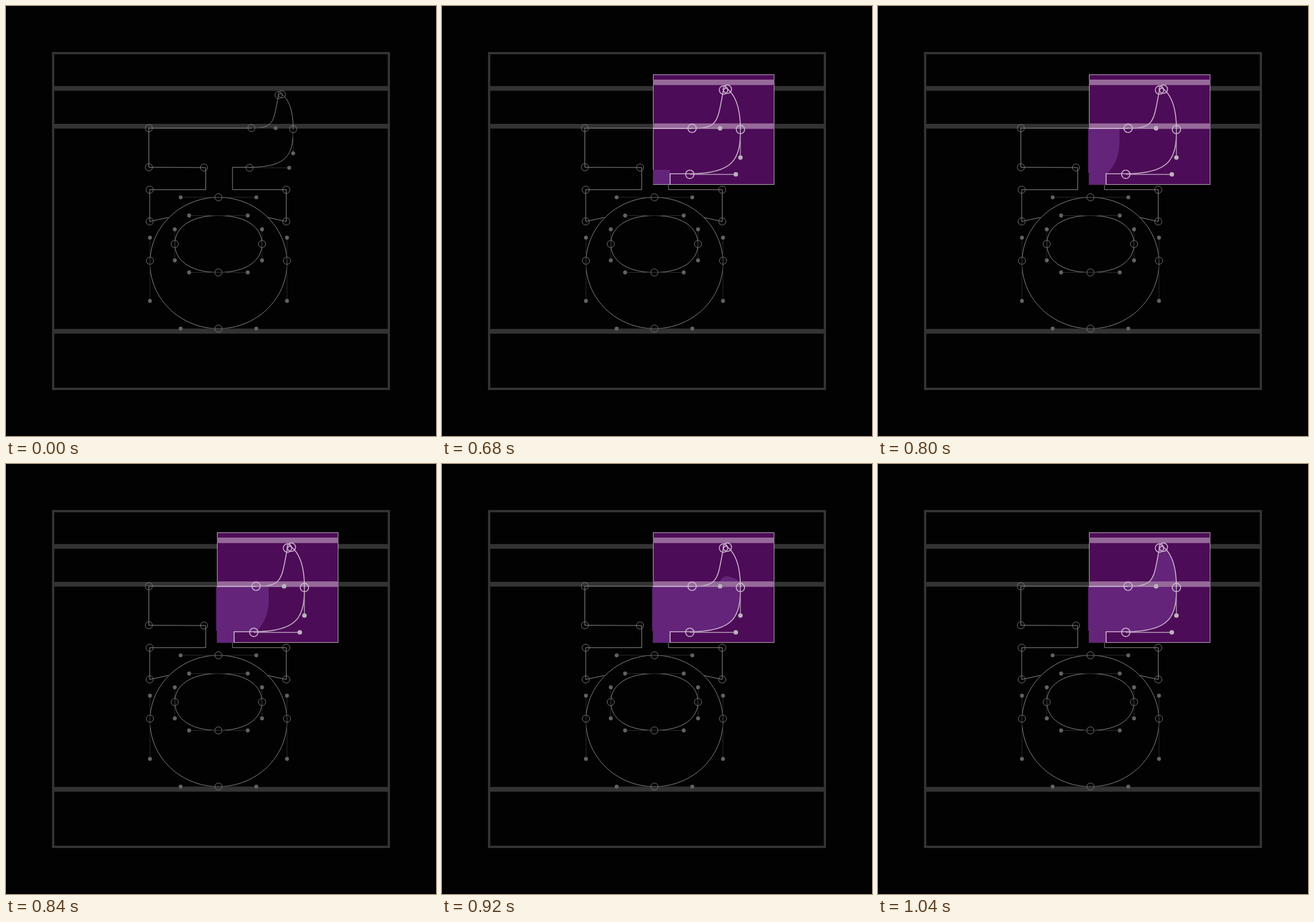
Animation of 748 by 748 pixels, one loop 3.64 s. Source, as an HTML page:

```html
<!DOCTYPE html>
<html lang="en">
<head>
<meta charset="utf-8">
<title>Glyph outline</title>
<style>
  html, body { margin: 0; width: 100%; height: 100%; overflow: hidden; background: #020202; }
  svg { display: block; width: 100%; height: 100%; fill: none; }
  .base { --line: #8c8c8c; --ring: #777; --dot: #626262; --arm: #2c2c2c; stroke-width: 1; }
  .zoom { --line: #cdb6d0; --ring: #cdb6d0; --dot: #bbb2bd; --arm: #a688ab; stroke-width: 1.4; }
  .line { stroke: var(--line); }
  .ring { stroke: var(--ring); }
  .arm { stroke: var(--arm); }
  .dot { fill: var(--dot); }
</style>
</head>
<body>
<svg viewBox="0 0 748 748">
  <defs>
    <clipPath id="box"><rect x="367" y="119" width="211" height="192"/></clipPath>
    <clipPath id="wipe"><path id="edge"/></clipPath>
    <path id="bands" d="M84 143.4H664M84 209.2H664M84 565.8H664" stroke-width="8.2"/>
    <g id="hook"></g>
  </defs>

  <rect x="82" y="82" width="584" height="584" stroke="#333" stroke-width="4"/>
  <use href="#bands" stroke="#333"/>
  <g class="base">
    <g id="body"></g>
    <use href="#hook"/>
  </g>

  <g id="panel" visibility="hidden">
    <rect x="367.5" y="119.5" width="210.2" height="191" fill="#4d0c57" stroke="#b8a5ba" stroke-width="1.1"/>
    <g clip-path="url(#wipe)">
      <path id="ink" fill="#64247a" transform="translate(-60.3 -33.6) scale(1.16)"/>
    </g>
    <g clip-path="url(#box)">
      <g class="zoom" transform="translate(-60.3 -33.6) scale(1.16)">
        <use href="#bands" stroke="#966a9a"/>
        <use href="#hook"/>
      </g>
    </g>
  </g>
</svg>
<script>
const $ = id => document.getElementById(id);
const body = $('body'), hook = $('hook');

function add(parent, tag, attrs) {
  const el = document.createElementNS('http://www.w3.org/2000/svg', tag);
  for (const k in attrs) el.setAttribute(k, attrs[k]);
  parent.append(el);
}
const stroke = (parent, d, cls = 'line') => add(parent, 'path', { class: cls, d });
const ring = (parent, [cx, cy]) => add(parent, 'circle', { class: 'ring', r: 6.3, cx, cy });
const dot = (parent, [cx, cy]) => add(parent, 'circle', { class: 'dot', r: 3.4, cx, cy });

// Closed curve with a node and a tangent arm at each extreme.
// hx, hy: curve handles; arm, drop: half length and shift of the side arms.
function bowl({ cx, cy, rx, ry, hx, hy, arm, drop, lift = 0, top = true }) {
  const l = cx - rx, r = cx + rx, t = cy - ry, b = cy + ry;
  stroke(body, `M${l} ${cy}C${l} ${cy - hy} ${cx - hx} ${t} ${cx} ${t}S${r} ${cy - hy} ${r} ${cy}` +
    `S${cx + hx} ${b} ${cx} ${b}S${l} ${cy + hy} ${l} ${cy}Z`);
  for (const s of [-1, 1]) {
    const x = cx + s * rx, y = cy + s * ry, mid = cy + drop;
    stroke(body, `M${x} ${mid - arm}V${mid + arm}M${cx - hx} ${y}H${cx + hx}`, 'arm');
    for (const e of [-1, 1]) {
      dot(body, [x, mid + e * arm]);
      dot(body, [cx + e * hx, y]);
    }
    ring(body, [x, cy - lift]);
    if (top || s > 0) ring(body, [cx, y]);
  }
}
bowl({ cx: 369.6, cy: 447, rx: 119.2, ry: 114.2, hx: 65.8, hy: 63, arm: 55, drop: 11, lift: 4 });
bowl({ cx: 369.5, cy: 414, rx: 75.9, ry: 49.5, hx: 51, hy: 27, arm: 27, drop: 1.5, top: false });

// Stem: left shoulder, then a foot mirrored to the other side.
const shoulder = [[248.5, 212.5], [248.5, 280.5], [344.5, 281]];
const foot = [[250, 319.6], [250, 374.8]];
const mirror = ([x, y]) => [737.5 - x, y];
const tip = [282.5, 367.8];
stroke(body, `M${shoulder.join('L')}H347.5V319.5L${foot.join('L')}L${tip}`);
stroke(body, `M${[...foot, tip].map(mirror).join('L')}`);
[...shoulder, ...foot, ...foot.map(mirror)].forEach(p => ring(body, p));

// The hook shares its curve with the ink that fills it.
const curve = 'H427C467 212.5 465 202 474 155L477 151.5L480 153.5' +
  'C494.5 165 499.5 187 499.5 214C499.5 256 492 280.5 423.5 280.5H394';
stroke(hook, `M248.5 212.5${curve}V319.5H487.5`);
$('ink').setAttribute('d', `M367.1 212.5${curve}V297H368.2V279H367.1Z`);

const nodes = [[427, 212.3], [499.5, 214.2], [423.6, 281.4]];
const offsets = [[42, 0], [0, 42], [69, 0]];
nodes.forEach(([x, y], i) => {
  const end = [x + offsets[i][0], y + offsets[i][1]];
  stroke(hook, `M${x} ${y}L${end}`, 'arm');
  dot(hook, end);
});
[...nodes, [474.1, 155], [479.9, 153.7]].forEach(p => ring(hook, p));

// The ink climbs the stem, sweeps right, then rises into the tail.
function wipe(step) {
  if (step < 0) return '';
  if (step < 2) return `M367 ${285 - 30 * step}H397V310H367Z`;
  if (step < 3) return 'M360 213H381V226H397V312H360Z';
  if (step < 6) {
    const x = 420 + 37 * (step - 3);
    return `M360 213H${x}V240Q${x - 1} 270 ${x - 20} 290V312H360Z`;
  }
  const k = step - 6, x = 483 - 10 * k, y = 195 - 19 * k;
  return `M360 312V205H${x}Q${x + 3} ${y + 1} 495 ${y}Q509 ${y + 2} 518 ${y + 10}H530V312Z`;
}

function frame(now) {
  const t = now % 3640;
  $('panel').setAttribute('visibility', t < 520 ? 'hidden' : 'visible');
  $('edge').setAttribute('d', wipe(Math.min(9, Math.floor((t - 680) / 40))));
  requestAnimationFrame(frame);
}
requestAnimationFrame(frame);
</script>
</body>
</html>
```
